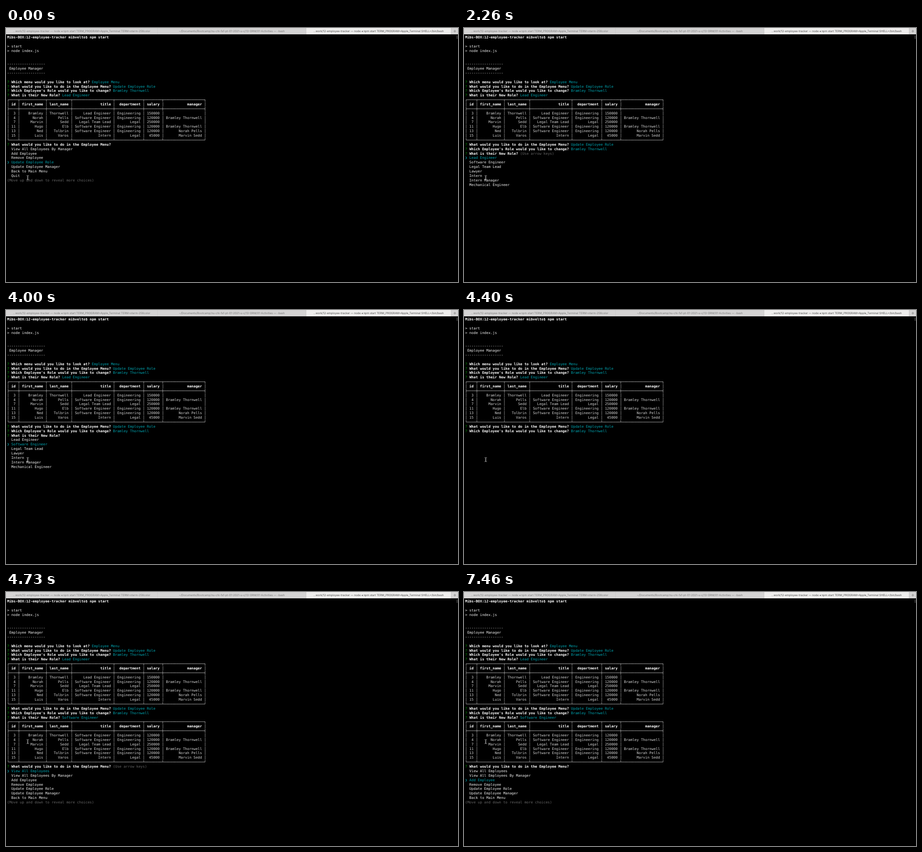
An HTML page that plays this animation: 998x561 px, repeating every 8000 ms.

```html
<!DOCTYPE html>
<html lang="en">
<head>
<meta charset="utf-8">
<title>Employee Manager</title>
<style>
  html, body { margin: 0; width: 100%; height: 100%; overflow: hidden; background: #000; }
  svg { display: block; width: 998px; height: 561px; }
  text { text-rendering: geometricPrecision; }
  #screen { font: 7.774px "DejaVu Sans Mono", monospace; fill: #f4f4f4; }
  #tabs { font: 6.03px Inter, sans-serif; text-anchor: middle; }
  .b { font-weight: bold; fill: #fff; }
  .c { fill: #00a6b2; }
  .g { fill: #00a600; }
  .d { fill: #666; }
  .t { fill: #d6d6d6; }
</style>
</head>
<body>
<svg viewBox="0 0 998 561">
  <rect width="998" height="561"/>
  <g id="tabs"></g>
  <g id="screen"></g>
  <path d="M996 16v8" stroke="#777" stroke-width="1"/>
  <path id="pointer" fill="none" stroke="#c4c4c4" stroke-width="1"
        d="M45.6 326q2.4 0 2.4 1.4q0-1.4 2.4-1.4M48 327v7M45.6 335q2.4 0 2.4-1.4q0 1.4 2.4 1.4M46.8 331h2.4"/>
</svg>
<script>
const LOOP = 8000, LEFT = 2.5, BASELINE = 23, LINE = 9.867;

// Window tabs
const task = '…work/12-employee-tracker — node ◂ npm start TERM_PROGRAM=Apple_Terminal ';
const tabs = [
  [0, 335, task + 'TERM=xterm-256color'],
  [335, 328, '~/Documents/Bootcamp/nu-chi-fsf-pt-01-2021-u-c/13-ORM/01-Activities — -bash'],
  [663, 320, task + 'SHELL=/bin/bash']
];
document.getElementById('tabs').innerHTML =
  '<rect width="998" height="14" fill="#d4d3d3"/>' +
  tabs.map(([x, w, label], i) => {
    const active = i === 2;
    return `<rect x="${x}" width="${w}" height="14" fill="${active ? '#eeedec' : '#d4d3d3'}"/>` +
      `<path d="M${x + w} 0v14" stroke="#bebdbd" stroke-width=".8"/>` +
      `<text x="${x + w / 2 - .5}" y="9.3" fill="${active ? '#484848' : '#777'}">${label}</text>`;
  }).join('') +
  '<path d="M988 7h6M991 4v6" stroke="#777" stroke-width=".8"/>';

// Styled text
const span = (style, text) => `<tspan class="${style}">${text}</tspan>`;
const ask = (question, answer = '', style = 'c') =>
  span('g', '?') + ' ' + span('b', question) + ' ' + span(style, answer);
const choices = (items, selected) => items.map((item, i) =>
  i === selected ? span('c', '❯ ' + item) : '  ' + item);

// Data
const people = [
  [3, 'Bramley', 'Thornwell', 'Lead Engineer', 'Engineering', 150000, ''],
  [4, 'Norah', 'Pells', 'Software Engineer', 'Engineering', 120000, 'Bramley Thornwell'],
  [7, 'Marvin', 'Sedd', 'Legal Team Lead', 'Legal', 250000, ''],
  [11, 'Hugo', 'Elb', 'Software Engineer', 'Engineering', 120000, 'Bramley Thornwell'],
  [13, 'Ned', 'Tolbrin', 'Software Engineer', 'Engineering', 120000, 'Norah Pells'],
  [15, 'Luis', 'Varos', 'Intern', 'Legal', 45000, 'Marvin Sedd']
];
const updated = people.map((p, i) => i ? p : [...p.slice(0, 3), 'Software Engineer', p[4], 120000, '']);
const names = people.map(p => `${p[1]} ${p[2]}`);
const roles = ['Lead Engineer', 'Software Engineer', 'Legal Team Lead', 'Lawyer', 'Intern',
  'Intern Manager', 'Mechanical Engineer'];
const menu = ['View All Employees', 'View All Employees By Manager', 'Add Employee', 'Remove Employee',
  'Update Employee Role', 'Update Employee Manager', 'Back to Main Menu', 'Quit'];

function table(rows) {
  const head = ['id', 'first_name', 'last_name', 'title', 'department', 'salary', 'manager'];
  const widths = head.map((h, i) => Math.max(h.length, ...rows.map(r => String(r[i]).length)));
  const rule = (a, b, c) => a + widths.map(w => '─'.repeat(w + 2)).join(b) + c;
  const row = (cells, style) => span('t', '│ ') +
    cells.map((cell, i) => span(style, String(cell).padStart(widths[i]))).join(span('t', ' │ ')) +
    span('t', ' │');
  return [rule('┌', '┬', '┐'), row(head, 'b'), rule('├', '┼', '┤'),
    ...rows.map(r => row(r, 't')), rule('└', '┴', '┘')];
}

// Screens
const askMenu = 'What would you like to do in the Employee Menu?';
const askName = "Which Employee's Role would you like to change?";
const askRole = 'What is their New Role?';
const hint = '(Use arrow keys)';
const more = span('d', '(Move up and down to reveal more choices)');
const update = 'Update Employee Role';

const base = [
  span('b', 'Mibs-BOX:12-employee-tracker mibvelto$ npm start'), '',
  '&gt; start', '&gt; node index.js', '', '',
  '-'.repeat(18), ' Employee Manager', '-'.repeat(18), '',
  ask('Which menu would you like to look at?', 'Employee Menu'),
  ask(askMenu, update), ask(askName, names[0]), ask(askRole, roles[0]),
  ...table(people)
];
const chosen = [...base, ask(askMenu, update)];
const named = [...chosen, ask(askName, names[0])];
const answered = [...named, ask(askRole, roles[1])];
const listed = [...answered, ...table(updated)];
const finalMenu = (selected, note) =>
  [...listed, ask(askMenu, note, 'd'), ...choices(menu.slice(0, 7), selected), more];

const scenes = [
  [0, [...base, ask(askMenu), ...choices(menu.slice(1), 3), more]],
  [400, base],
  [465, chosen],
  [530, [...chosen, ask(askName, hint, 'd'), ...choices(names, 0)]],
  [2260, [...named, ask(askRole, hint, 'd'), ...choices(roles, 0)]],
  [3930, named],
  [4000, [...named, ask(askRole), ...choices(roles, 1)]],
  [4400, named],
  [4530, answered],
  [4660, listed],
  [4730, finalMenu(0, hint)],
  [7130, finalMenu(1)],
  [7460, finalMenu(2)]
];

const screen = document.getElementById('screen');
let shown;
function draw(time) {
  const [, lines] = scenes.findLast(([start]) => start <= time);
  if (lines === shown) return;
  shown = lines;
  screen.innerHTML = lines.map((line, i) =>
    `<text xml:space="preserve" x="${LEFT}" y="${(BASELINE + i * LINE).toFixed(2)}">${line}</text>`).join('');
}

const began = performance.now();
function tick() {
  draw((performance.now() - began) % LOOP);
  requestAnimationFrame(tick);
}
tick();
</script>
</body>
</html>
```
